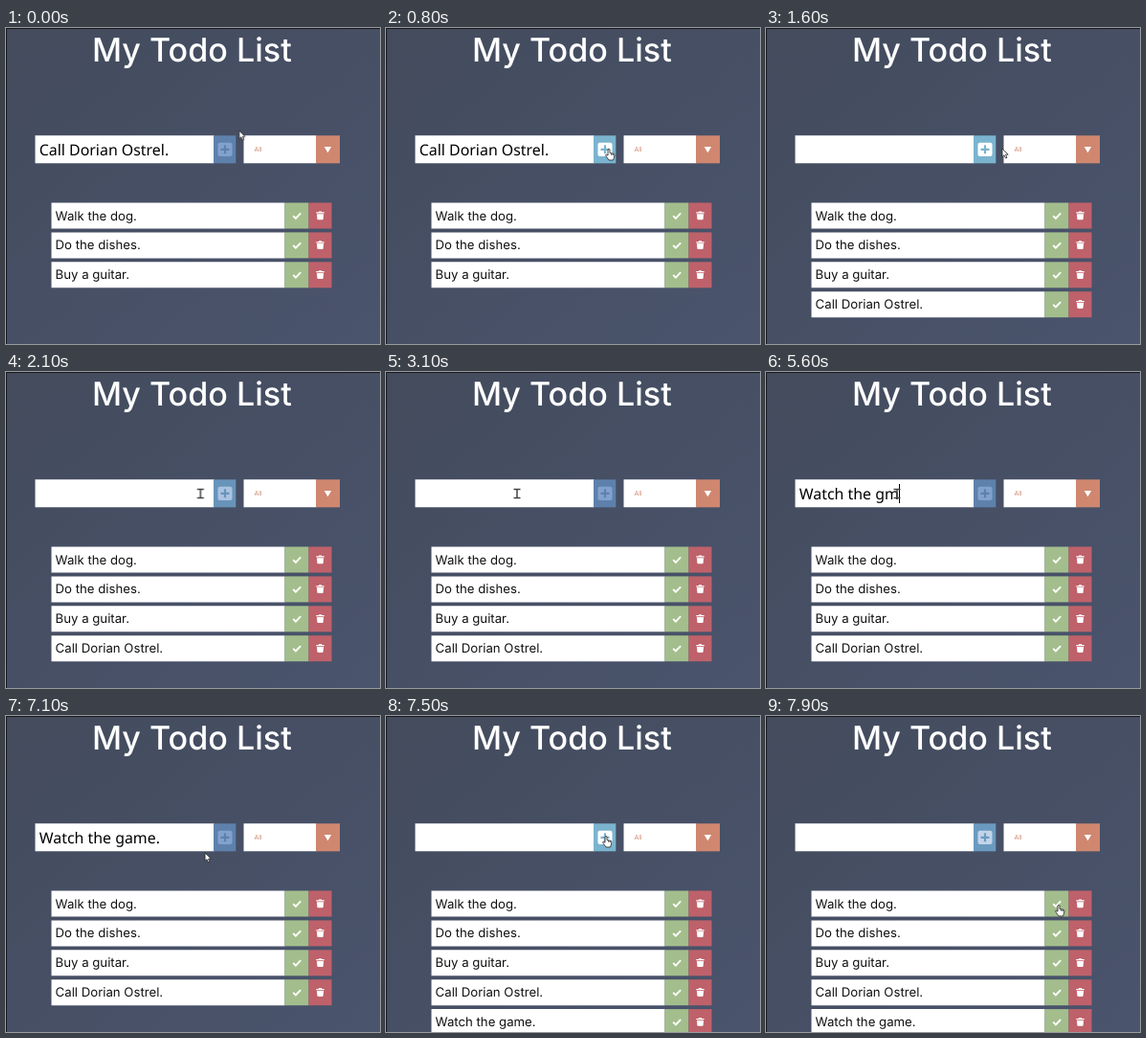
Recreate the animation shown at these times as an HTML page. Size 391x330 px, loop 8 s.

```html
<!DOCTYPE html>
<html lang="en">
<head>
<meta charset="utf-8">
<title>My Todo List</title>
<style>
  html, body { margin: 0; width: 100%; height: 100%; overflow: hidden; background: #454d5f; }
  svg { display: block; width: 391px; height: 330px; }
  text {
    font-family: Inter, "Open Sans", sans-serif;
    white-space: pre;
    text-rendering: geometricPrecision;
  }
  .title { font-size: 34.1px; font-weight: 500; fill: #fff; }
  .item { font-size: 13.2px; fill: #111; }
  .typed { font: 15.9px "Noto Sans", "Open Sans", sans-serif; fill: #000; }
  .all { font-size: 6.8px; fill: #d08770; }

  .add, .plus, .badge, .row4, .row5, .pointer, .arrow, .hand, .beam {
    animation: 8s linear infinite;
  }
  .add, .plus { animation-name: hover; color: #5e81ac; }
  .add { fill: currentColor; }
  .plus { stroke: currentColor; }
  .badge { fill: #82a2cd; animation-name: glow; }
  .row4 { animation-name: row4; animation-timing-function: step-end; }
  .row5 { animation-name: row5; animation-timing-function: step-end; }
  .pointer { animation-name: move; }
  .arrow { animation-name: arrow; animation-timing-function: step-end; }
  .hand { animation-name: hand; animation-timing-function: step-end; }
  .beam { animation-name: beam; animation-timing-function: step-end; }

  @keyframes hover {
    0%, 5.5% { color: #5e81ac; }
    9%, 20.2% { color: #7ab4cf; }
    23.75% { color: #6288b0; }
    25.6% { color: #6a98bd; }
    29%, 90% { color: #5e81ac; }
    93%, 96.25% { color: #7ab4cf; }
    98.75% { color: #6b9ac0; }
    100% { color: #6287b0; }
  }
  @keyframes glow {
    0%, 5.5% { fill: #82a2cd; }
    9%, 20.2% { fill: #fff; }
    23.75% { fill: #94b0d6; }
    25.6% { fill: #b5cae4; }
    29%, 90% { fill: #82a2cd; }
    93%, 96.25% { fill: #fff; }
    98.75% { fill: #c3d4e8; }
    100% { fill: #94b0d6; }
  }
  @keyframes row4 { 0% { visibility: hidden; } 11.25%, 100% { visibility: visible; } }
  @keyframes row5 { 0% { visibility: hidden; } 93.75%, 100% { visibility: visible; } }
  @keyframes move {
    0% { transform: translate(244px, 107px); }
    3% { transform: translate(241px, 110px); }
    8.75%, 16.25% { transform: translate(233px, 127px); }
    20%, 22.5% { transform: translate(247px, 126px); }
    23.5% { transform: translate(249px, 127px); }
    31.25%, 32.5% { transform: translate(121px, 127px); }
    35%, 80.6% { transform: translate(137px, 127px); }
    88.75% { transform: translate(208px, 143px); }
    91.9%, 95.6% { transform: translate(230px, 126px); }
    98.75%, 100% { transform: translate(306px, 198px); }
  }
  @keyframes arrow {
    0% { visibility: visible; }
    5% { visibility: hidden; }
    18.5% { visibility: visible; }
    24.2% { visibility: hidden; }
    87.7% { visibility: visible; }
    90% { visibility: hidden; }
    96.1% { visibility: visible; }
    98.1%, 100% { visibility: hidden; }
  }
  @keyframes hand {
    0% { visibility: hidden; }
    5% { visibility: visible; }
    18.5% { visibility: hidden; }
    24.2% { visibility: visible; }
    25.6% { visibility: hidden; }
    90% { visibility: visible; }
    96.1% { visibility: hidden; }
    98.1%, 100% { visibility: visible; }
  }
  @keyframes beam {
    0% { visibility: hidden; }
    25.6% { visibility: visible; }
    87.7%, 100% { visibility: hidden; }
  }
</style>
</head>
<body>
<svg viewBox="0 0 391 330">
  <defs>
    <linearGradient id="bg" x1="0" y1="0" x2="1" y2="1">
      <stop offset="0" stop-color="#434b5c"/>
      <stop offset="1" stop-color="#4a546d"/>
    </linearGradient>
    <g id="row">
      <path fill="#fff" d="M47.500 0h244v27h-244z"/>
      <path fill="#a3be8c" d="M291.500 0h25v27h-25z"/>
      <path fill="#bf616a" d="M316.500 0h24v27h-24z"/>
      <path d="M300.200 13.600l2.700 2.700 5.200-5.400" fill="none" stroke="#fff" stroke-width="1.900"/>
      <path fill="#fff" d="M324.300 9.800h2.400l.5-.9h2.600l.5.900h2.400v1.200h-8.400zM324.900 11.700h7.200l-.5 5.200q-.1.800-.8.800h-4.600q-.7 0-.8-.8z"/>
    </g>
  </defs>

  <rect width="391" height="330" fill="url(#bg)"/>
  <path d="M0 .5h391M.5 0v330" stroke="#14171d"/>

  <text class="title" x="90" y="35">My Todo List</text>

  <path fill="#fff" d="M30.500 112.300h187v29h-187zM248.500 112.300h76v29h-76z"/>
  <text class="typed" id="typed" x="34.800" y="133"></text>
  <rect id="caret" y="117" width="1" height="20"/>

  <rect class="add" x="217" y="112.300" width="23.300" height="29"/>
  <rect class="badge" x="221.500" y="119.700" width="15" height="14.300" rx="2"/>
  <path class="plus" d="M224.500 126.800h9M229 122.300v9" stroke-width="2.200"/>

  <text class="all" x="259.500" y="129.300">All</text>
  <rect x="324" y="112.300" width="25" height="29" fill="#d08770"/>
  <path fill="#fff" d="M332.700 123.900h7.400l-3.700 6.400z"/>

  <g id="list"></g>

  <g class="pointer">
    <path class="arrow" fill="#fff" stroke="#222" stroke-width=".8" d="M0 0v8.500l2-1.800 1.500 3.300 1.500-.7-1.500-3.100h2.700z"/>
    <path class="hand" fill="#fff" stroke="#333" stroke-width=".9" stroke-linejoin="round"
      d="M-1 0q1-1.200 2 0v3.500l4 .8q1 .3.900 1.500l-.6 3-.8 2.200h-4.500l-2.500-3.500q-1.300-1.700-.6-2.200.7-.4 2.100.9zM2.700 4v1.800M4.300 4.300v1.700"/>
    <path class="beam" fill="none" stroke="#444" stroke-width="1.500" d="M-3.500-4.500h7M-3.500 4.500h7M0-4.500v9"/>
  </g>
</svg>
<script>
  const LOOP = 8000;
  const friend = "Call Dorian Ostrel.";
  const game = "Watch the game.";
  const typed = document.getElementById("typed");
  const caret = document.getElementById("caret");

  document.getElementById("list").innerHTML =
    ["Walk the dog.", "Do the dishes.", "Buy a guitar.", friend, game].map((label, i) =>
      `<g class="row${i + 1}"><use href="#row" y="${182.5 + 30.9 * i}"/>` +
      `<text class="item" x="51.6" y="${200.5 + 30.9 * i}">${label}</text></g>`).join("");

  // [time, input value]
  const first = n => game.slice(0, n);
  const keys = [
    [0, friend], [900, ""], [4100, first(1)], [4200, first(2)], [4500, first(3)],
    [4600, first(4)], [5000, first(5)], [5100, first(6)], [5200, first(8)],
    [5300, first(9)], [5400, first(11)], [5600, first(11) + "m"], [5900, first(11)],
    [6000, first(12)], [6100, first(13)], [6200, first(14)], [6400, game], [7500, ""]
  ];
  const caretOn = [[3000, 3100], [3600, 4000], [4100, 6900]];

  let start;
  function draw(now) {
    start ??= now;
    const t = (now - start) % LOOP;
    const value = keys.findLast(key => key[0] <= t)[1];
    if (typed.textContent !== value) typed.textContent = value;
    const end = value ? typed.getComputedTextLength() : 0;
    caret.setAttribute("x", Math.round(35 + end));
    caret.style.visibility = caretOn.some(([a, b]) => t >= a && t < b) ? "visible" : "hidden";
    requestAnimationFrame(draw);
  }
  requestAnimationFrame(draw);
</script>
</body>
</html>
```
